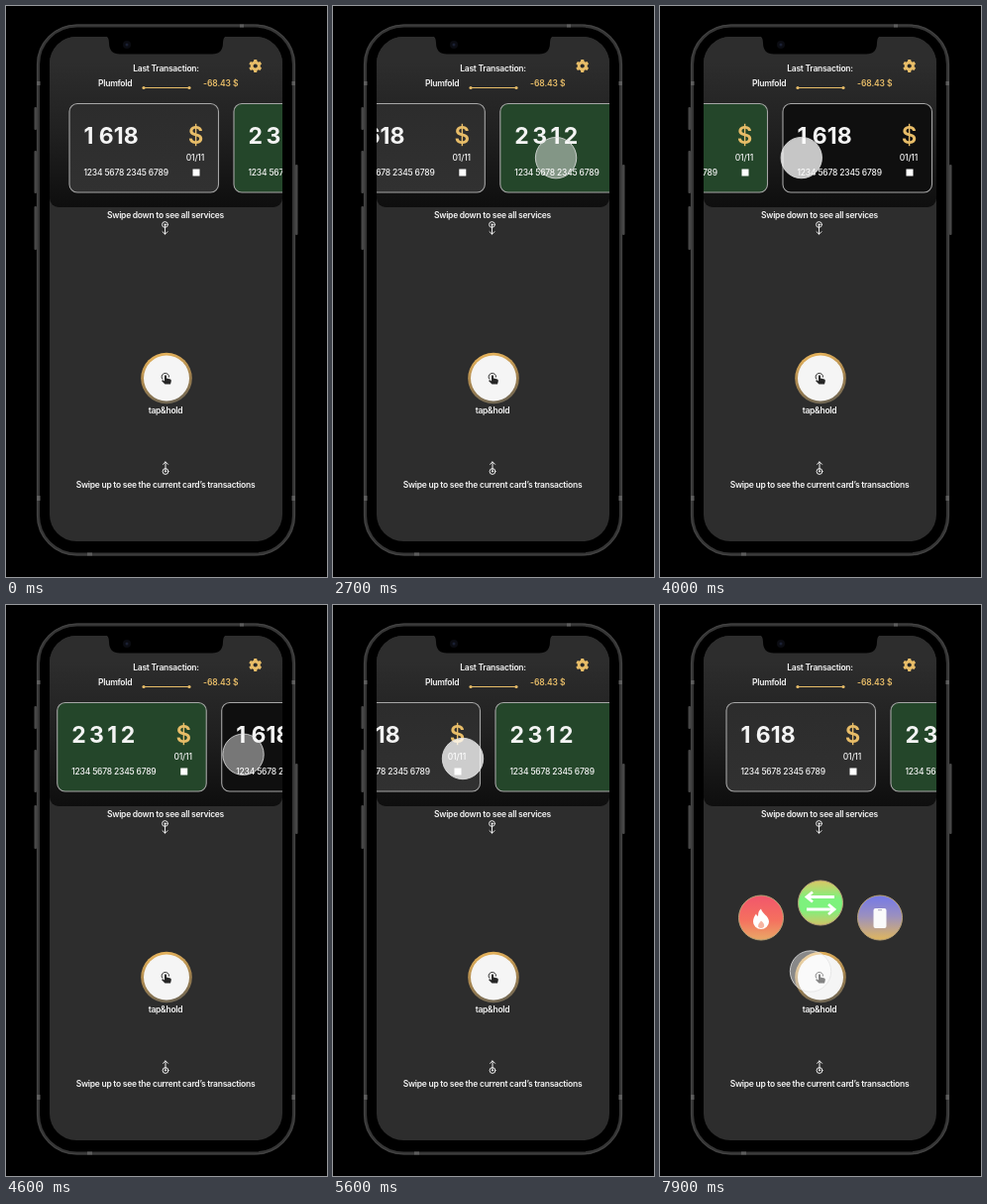
These frames come from a looping animation (324 px wide and 576 px high, 8000 ms). An HTML page:

```html
<!DOCTYPE html>
<html lang="en">
<head>
<meta charset="utf-8">
<title>Card carousel</title>
<style>
  html, body { margin: 0; width: 100%; height: 100%; overflow: hidden; background: #000; }
  svg { display: block; width: 100vw; height: 100vh; }
  text { font-family: Inter, Roboto, "Liberation Sans", sans-serif; fill: #f4f4f4; font-size: 8.5px; letter-spacing: -.26px; font-weight: 600; }
  .mid { text-anchor: middle; }
  .end { text-anchor: end; }
  .gold { fill: #e8bd68; }
  .sum { font-size: 23px; font-weight: 700; letter-spacing: 0; }
  .wide { letter-spacing: 3.4px; }
  .sign { font-size: 24px; letter-spacing: 0; }
  .thin { font-weight: 500; letter-spacing: -.2px; }
  .loose { letter-spacing: -.08px; }
  .line { fill: none; stroke: #f0f0f0; stroke-linecap: round; stroke-linejoin: round; }
</style>
</head>
<body>
<svg viewBox="0 0 324 576" xmlns="http://www.w3.org/2000/svg">
  <defs>
    <linearGradient id="head" x2="0" y2="1">
      <stop offset=".2" stop-color="#2d2d2d"/><stop offset=".6" stop-color="#202020"/><stop offset="1" stop-color="#0e0e0e"/>
    </linearGradient>
    <linearGradient id="grey" x2="0" y2="1">
      <stop stop-color="#2c2c2c"/><stop offset="1" stop-color="#313131"/>
    </linearGradient>
    <linearGradient id="ring" x1=".35" x2=".6" y2="1">
      <stop stop-color="#e9b55c"/><stop offset=".5" stop-color="#a98750"/><stop offset="1" stop-color="#6f6654"/>
    </linearGradient>
    <linearGradient id="red" x2="0" y2="1">
      <stop stop-color="#f2566c"/><stop offset=".55" stop-color="#f5705f"/><stop offset="1" stop-color="#e9a866"/>
    </linearGradient>
    <linearGradient id="green" x2="0" y2="1">
      <stop stop-color="#dcc765"/><stop offset=".4" stop-color="#7df27d"/><stop offset=".65" stop-color="#7df27d"/><stop offset="1" stop-color="#d2c468"/>
    </linearGradient>
    <linearGradient id="blue" x2="0" y2="1">
      <stop stop-color="#7479e8"/><stop offset=".45" stop-color="#9a8fc0"/><stop offset="1" stop-color="#dfb65e"/>
    </linearGradient>
    <clipPath id="screen"><rect x="44" y="31" width="235" height="509" rx="27"/></clipPath>
    <g id="swipe"><circle r="2.9"/><circle r=".6"/><path d="M0 0V9.500M-2.500 7.200L0 9.700L2.500 7.200"/></g>
  </defs>

  <rect width="324" height="576"/>

  <g fill="#484848">
    <rect x="28.500" y="102" width="2.500" height="23" rx="1"/>
    <rect x="28.500" y="146" width="2.500" height="43" rx="1"/>
    <rect x="28.500" y="202" width="2.500" height="44" rx="1"/>
    <rect x="292" y="160" width="2.500" height="71" rx="1"/>
  </g>
  <rect x="32.500" y="20" width="258" height="533" rx="39" stroke="#353535" stroke-width="3.200"/>
  <rect x="31.500" y="19" width="260" height="535" rx="40" fill="none" stroke="#484848" stroke-width=".8"/>
  <g fill="#5c5c5c">
    <rect x="31" y="76" width="3.500" height="4"/><rect x="288.500" y="76" width="3.500" height="4"/>
    <rect x="31" y="494" width="3.500" height="5"/><rect x="288.500" y="494" width="3.500" height="5"/>
    <rect x="236" y="18.500" width="4" height="3"/><rect x="82" y="551.500" width="5" height="3"/>
  </g>

  <g clip-path="url(#screen)">
    <rect x="44" y="31" width="235" height="509" fill="#2d2d2d"/>
    <rect x="44" y="20" width="235" height="183" rx="9" fill="url(#head)"/>
    <g id="cards"></g>
  </g>
  <path d="M100 30Q104 31 104 37Q104 48.500 115 48.500H208Q219 48.500 219 37Q219 31 223 30Z"/>
  <circle cx="122" cy="39" r="4" fill="#0b0c12"/><circle cx="122" cy="39" r="1.500" fill="#1a2033"/>

  <text class="mid" x="161.500" y="65.500">Last Transaction:</text>
  <text x="93" y="80.500">Plumfold</text>
  <text class="gold loose" x="199" y="80.500">-68.43 $</text>
  <g class="gold">
    <rect x="139" y="82" width="46" height="1"/>
    <circle cx="139" cy="82.500" r="1.600"/><circle cx="185" cy="82.500" r="1.600"/>
  </g>
  <g id="gear" transform="translate(251.700 60.500)" class="gold"></g>

  <text class="mid" x="161" y="213.500">Swipe down to see all services</text>
  <use href="#swipe" class="line" transform="translate(160.500 220.500)"/>
  <use href="#swipe" class="line" transform="translate(161 469.500) scale(1 -1)"/>
  <text class="mid" x="161" y="486">Swipe up to see the current card’s transactions</text>

  <g id="menu" stroke="#b8a276">
    <g><circle r="22.500" fill="url(#red)"/>
      <path fill="#fff" stroke="none" d="M0-9C1-4 8-2 8 4A8 7.500 0 0 1-8 4C-8 1-7-1-5-4Q-4-1-3-2Q-3-7 0-9Z"/>
      <path fill="#f7b5a2" stroke="none" d="M0 3Q4 6 3 9Q0 12-3 9Q-3 6 0 3Z"/></g>
    <g><circle r="22.500" fill="url(#green)"/>
      <g fill="none" stroke="#fff" stroke-width="2.800"><path d="M-13-6H14M-8-11L-14-6L-8-1M14 6.500H-14M8 1.500L14 6.500L8 11.500"/></g></g>
    <g><circle r="22.500" fill="url(#blue)"/>
      <g stroke="none"><rect x="-6.500" y="-9.500" width="13" height="20" rx="2" fill="#fafafa"/><rect x="-2" y="-8.300" width="4" height="1" fill="#aaa3bb"/></g></g>
  </g>

  <g transform="translate(162 375.500)">
    <circle r="25.800" fill="url(#ring)"/><circle r="23" fill="#f5f5f5"/>
    <path d="M-4 1A3.700 3.700 0 1 1 2.500-1" fill="none" stroke="#333"/>
    <path d="M-2-2.500Q-1-4 0-2.500V0L4 1Q5 1.500 4.800 3L4 6H-1.500L-4.800 2.800Q-4.300 1.500-3.300 2L-2 3Z" fill="#262626"/>
  </g>
  <text class="mid" x="161" y="411">tap&amp;hold</text>

  <circle id="finger" r="20.700" fill="#fff" stroke="#e4e4e4" stroke-opacity=".8"/>
</svg>

<script>
const LOOP = 8000, STEP = 100, PITCH = 166;
const $ = id => document.getElementById(id);
const clamp = u => Math.min(1, Math.max(0, u));
const glide = u => Math.sin(clamp(u) * Math.PI / 2);
const swing = u => (1 - Math.cos(clamp(u) * Math.PI)) / 2;

// Card row: start, duration, distance of each coasting scroll.
const scrolls = [[2600, 700, -275], [3500, 400, 3], [4170, 1430, 206], [5600, 600, 70], [6400, 400, -1]];

// Finger: start, duration, dx, dy, and whether it presses meanwhile.
const moves = [
  [1700, 800, -108, -117],
  [2600, 400, -102, 1, true],
  [3000, 300, 24, 1],
  [3300, 800, -20, -2],
  [4150, 675, 130, -3, true],
  [5000, 600, -141, 5],
  [5600, 600, 100, 0, true],
  [6115, 800, 0, 220],
  [6400, 500, -68, 0],
  [7250, 800, -12, -6, true]
];

function finger(t) {
  let x = 348, y = 270, press = 0;
  for (const [start, span, dx, dy, down] of moves) {
    const e = swing((t - start) / span);
    x += dx * e;
    y += dy * e;
    if (down) press += clamp((t - start) / 100) * clamp((start + span - t) / 100);
  }
  return { x, y, press };
}

function card(i, fill, sum, wide) {
  return `<g transform="translate(${i * PITCH} 98.5)">
    <rect width="150.500" height="89.500" rx="8" fill="${fill}" stroke="#a6a6a6" stroke-width="1.100"/>
    <text class="sum ${wide}" x="14.500" y="40">${sum}</text>
    <text class="sign gold mid" x="127.500" y="40">$</text>
    <text class="end thin" x="136" y="57.500">01/11</text>
    <text class="thin" x="14.500" y="72.500">1234 5678 2345 6789</text>
    <rect x="124.500" y="66" width="7" height="7" fill="#fff"/></g>`;
}

$("cards").innerHTML = card(0, "url(#grey)", "1 618", "") + card(1, "#24462a", "2312", "wide") + card(2, "#0f0f0f", "1 618", "");

$("gear").innerHTML = [0, 60, 120].map(a =>
  `<rect x="-1.700" y="-6.500" width="3.400" height="13" rx=".8" transform="rotate(${a})"/>`).join("") +
  '<circle r="5"/><circle r="2.100" fill="#292929"/>';

const items = [...$("menu").children];

function draw(t) {
  const scroll = scrolls.reduce((x, [start, span, dx]) => x + dx * glide((t - start) / span), 64);
  $("cards").setAttribute("transform", `translate(${scroll} 0)`);

  const { x, y, press } = finger(t);
  $("finger").setAttribute("transform", `translate(${x} ${y})`);
  $("finger").setAttribute("fill-opacity", .76 - .33 * press);
  $("finger").style.display = t < 1800 ? "none" : "";

  // Menu items fan out of the button.
  const e = glide((t - 7600) / 300);
  items.forEach((item, i) => {
    const side = i - 1, dx = 60 * side, dy = 15 * Math.abs(side) - 75;
    item.setAttribute("transform", `translate(${162 + dx * e} ${375.5 + dy * e}) scale(${e})`);
    item.setAttribute("opacity", e);
  });
}

const start = performance.now();
function tick() {
  const t = (performance.now() - start) % LOOP;
  draw(Math.floor(t / STEP) * STEP);
  requestAnimationFrame(tick);
}
tick();
</script>
</body>
</html>
```
